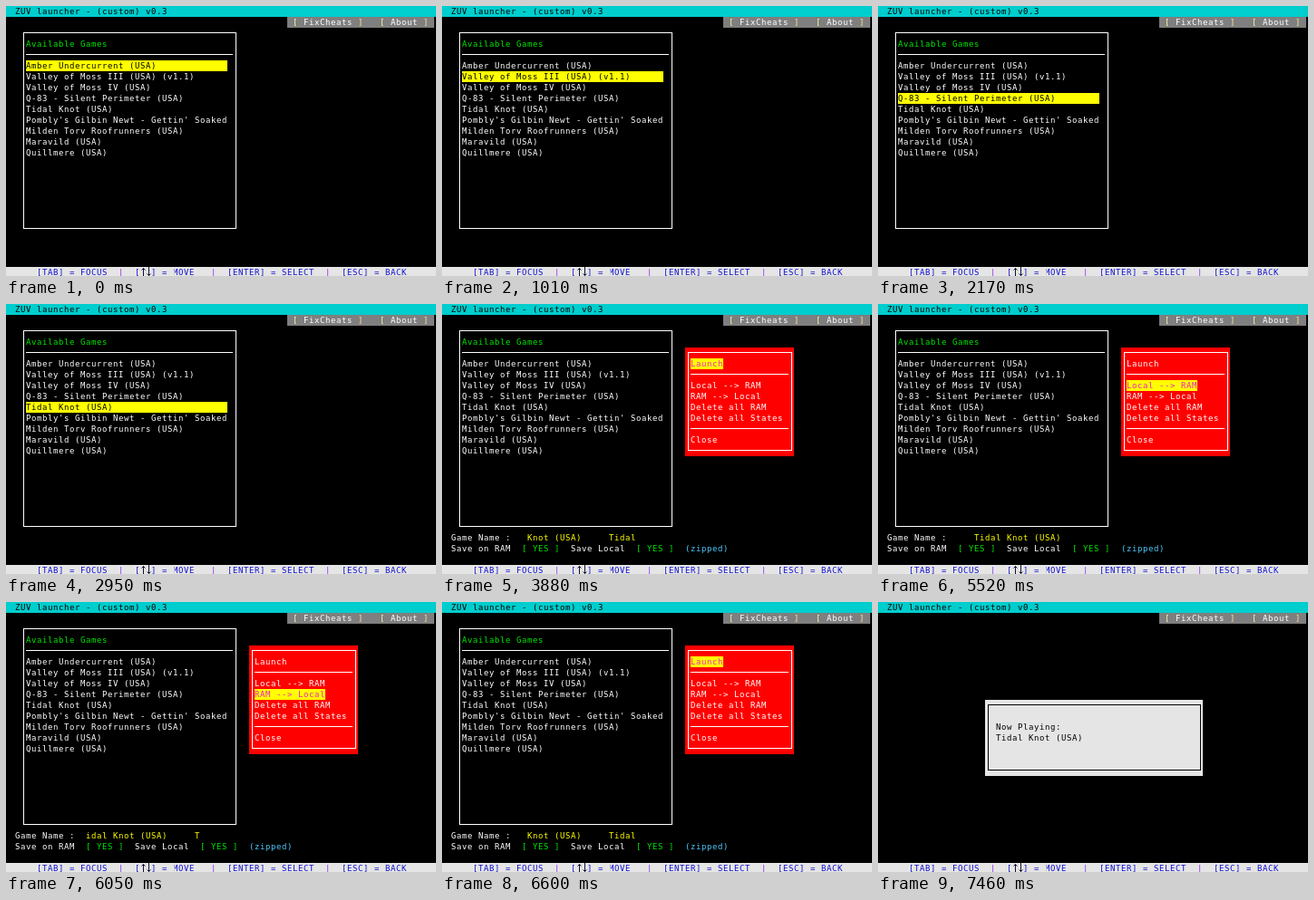
Recreate the animation shown at these times as an HTML page. Size 474 px wide and 298 px high, loop 8.62 s.

```html
<!DOCTYPE html>
<html lang="en">
<head>
<meta charset="utf-8">
<title>Launcher</title>
<style>
  html, body { margin: 0; width: 100%; height: 100%; overflow: hidden; background: #000; }
  svg { display: block; width: 474px; height: 298px; }
  /* 9px glyphs spaced out to the 6px cell */
  text {
    font: 9px "DejaVu Sans Mono", "Liberation Mono", monospace;
    letter-spacing: .582px;
    white-space: pre;
  }
</style>
</head>
<body>
<svg id="stage" viewBox="0 0 474 298"></svg>
<script>
const LOOP = 8620;
const WHITE = '#fff', PALE = '#e5e5e5', YELLOW = '#ff0', GREEN = '#00e600', BLUE = '#1010d0';

const games = [
  'Amber Undercurrent (USA)',
  'Valley of Moss III (USA) (v1.1)',
  'Valley of Moss IV (USA)',
  'Q-83 - Silent Perimeter (USA)',
  'Tidal Knot (USA)',
  "Pombly's Gilbin Newt - Gettin' Soaked",
  'Milden Torv Roofrunners (USA)',
  'Maravild (USA)',
  'Quillmere (USA)'
];
const chosen = games[4];
const menuItems = [[5, 'Launch'], [7, 'Local --> RAM'], [8, 'RAM --> Local'],
  [9, 'Delete all RAM'], [10, 'Delete all States'], [12, 'Close']];

// [start time, selected index]
const listSteps = [[0, 0], [1010, 1], [1560, 2], [2170, 3], [2950, 4], [3880, -1]];
const menuSteps = [[3880, 0], [5450, 1], [5830, 2], [6370, 1], [6600, 0]];
const ticks = [4040, 4110, 4280, 4430, 4510, 4660, 4810, 4890, 5060, 5130, 5300, 5370, 5520,
  5670, 5750, 5900, 6050, 6130, 6300, 6450, 6600, 6680, 6830, 6910, 7060, 7140, 7290];
const MENU_AT = 3880, PLAY_AT = 7460;

// Character grid: 6 x 12 px cells, shifted 4 px right
const colX = c => 4 + c * 6;
const stage = document.getElementById('stage');

function add(parent, tag, attrs) {
  const node = document.createElementNS('http://www.w3.org/2000/svg', tag);
  for (const key in attrs) node.setAttribute(key, attrs[key]);
  return parent.appendChild(node);
}
const group = () => add(stage, 'g', {});
const rect = (parent, x, y, width, height, fill) =>
  add(parent, 'rect', { x, y, width, height, fill });
const frame = (parent, x, y, width, height, stroke) =>
  add(parent, 'rect', { x: x + .5, y: y + .5, width, height, fill: 'none', stroke });
function write(parent, col, row, str, fill) {
  const node = add(parent, 'text', { x: colX(col), y: row * 12 + 9, fill });
  node.textContent = str;
  return node;
}

// Title bar and buttons
const chrome = group();
rect(chrome, 0, 0, 474, 12, '#00cdcd');
write(chrome, 1, 0, 'ZUV launcher - (custom) v0.3', '#000');
rect(chrome, 310, 12, 162, 12, '#7f7f7f');
for (const [col, label] of [[52, 'FixCheats'], [68, 'About']]) {
  write(chrome, col, 1, '[', '#fff4b0');
  write(chrome, col + 2, 1, label, WHITE);
  write(chrome, col + label.length + 3, 1, ']', '#ffe0a0');
}

// Key hints
rect(chrome, 0, 288, 474, 10, PALE);
for (const [col, hint] of [[5, '[TAB] = FOCUS'], [23, '[  ] = MOVE'],
  [40, '[ENTER] = SELECT'], [61, '[ESC] = BACK']]) write(chrome, col, 24, hint, BLUE);
for (const col of [20, 37, 58]) write(chrome, col, 24, '|', '#8a2cf0');
rect(chrome, 184, 288, 1.5, 10, PALE);
add(chrome, 'path', {
  d: 'M151.5 298V289.5M149.5 291.5L151.5 289.5L153.5 291.5M157.5 288V297.5M155.5 295.5L157.5 297.5L159.5 295.5',
  fill: 'none', stroke: '#101030'
});

// Game list
const list = group();
frame(list, 19, 29, 234, 216, WHITE);
write(list, 3, 3, 'Available Games', GREEN);
rect(list, 22, 53, 228, 1, WHITE);
const listBar = rect(list, 22, 60, 222, 12, YELLOW);
const listRows = games.map((name, i) => write(list, 3, 5 + i, name, WHITE));

// Action menu and game details
const menu = group();
rect(menu, 268, 48, 120, 120, '#f00');
frame(menu, 271, 53, 114, 108, WHITE);
rect(menu, 274, 77, 108, 1, WHITE);
rect(menu, 274, 137, 108, 1, WHITE);
const menuBar = rect(menu, 274, 60, 36, 12, YELLOW);
const menuRows = menuItems.map(([row, label]) => write(menu, 45, row, label, WHITE));
write(menu, 1, 21, 'Game Name :', WHITE);
const marquee = write(menu, 14, 21, '', YELLOW);
write(menu, 1, 22, 'Save on RAM', WHITE);
write(menu, 14, 22, '[ YES ]', GREEN);
write(menu, 23, 22, 'Save Local', WHITE);
write(menu, 35, 22, '[ YES ]', GREEN);
write(menu, 44, 22, '(zipped)', '#50ccff');

// Now playing dialog
const dialog = group();
rect(dialog, 118, 108, 240, 84, PALE);
frame(dialog, 121, 113, 234, 72, '#000');
write(dialog, 21, 11, 'Now Playing:', '#000');
write(dialog, 21, 12, chosen, '#000');

const show = (node, on) => node.setAttribute('visibility', on ? 'visible' : 'hidden');
const valueAt = (steps, t) => steps.reduce((v, [at, next]) => t >= at ? next : v, steps[0][1]);
const paint = (rows, selected, color) =>
  rows.forEach((row, i) => row.setAttribute('fill', i === selected ? color : WHITE));

function render(t) {
  const playing = t >= PLAY_AT;
  const menuOpen = t >= MENU_AT && !playing;
  show(list, !playing);
  show(menu, menuOpen);
  show(dialog, playing);

  const game = valueAt(listSteps, t);
  show(listBar, game >= 0 && !playing);
  listBar.setAttribute('y', (5 + game) * 12);
  paint(listRows, game, '#000');

  const item = valueAt(menuSteps, t);
  const [row, label] = menuItems[item];
  menuBar.setAttribute('y', row * 12);
  menuBar.setAttribute('width', label.length * 6);
  paint(menuRows, item, '#f020c8');

  // The name scrolls left and wraps in a 21-character window
  const shift = (5 + ticks.filter(at => t >= at).length) % 21;
  const padded = chosen.padEnd(21);
  marquee.textContent = padded.slice(shift) + padded.slice(0, shift);
}

const start = performance.now();
function loop() {
  render((performance.now() - start) % LOOP);
  requestAnimationFrame(loop);
}
loop();
</script>
</body>
</html>
```
